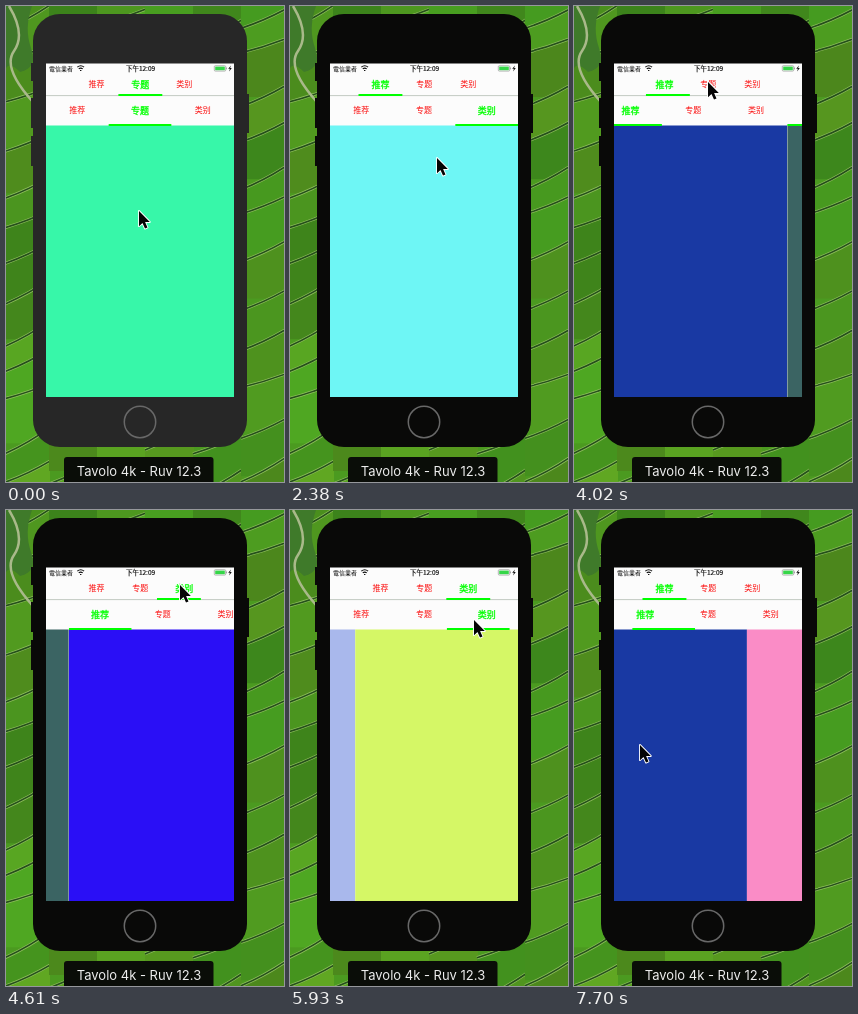
An HTML page that plays this animation: 278x476 px, repeating every 8 s.

```html
<!DOCTYPE html>
<html lang="zh-CN">
<head>
<meta charset="utf-8">
<title>Nested tab pages</title>
<style>
  html, body { margin: 0; width: 100%; height: 100%; overflow: hidden; background: #4b9a20; }
  svg { display: block; width: 278px; height: 476px; }
  text { font-family: "Noto Sans CJK SC", "Noto Sans CJK", "Noto Sans", sans-serif; text-anchor: middle; }
  .tab { font-size: 8px; fill: #fb0d0d; }
  .tab.on { font-size: 9px; fill: #0f0; stroke: #0f0; stroke-width: .3; }
  .bar { fill: #0f0; }
  .status { font-size: 6px; fill: #111; }
  .clock { font-size: 6.5px; stroke: #111; stroke-width: .2; }
  #phone { fill: #272727; }
  .active #phone { fill: #090908; }
  .caption { font: 13px Inter, Roboto, sans-serif; fill: #ededed; }
</style>
</head>
<body>
<svg id="stage" viewBox="0 0 278 476">
  <defs>
    <clipPath id="screen"><rect x="40" y="57.5" width="188" height="333.5"/></clipPath>
    <clipPath id="page"><rect x="40" y="90" width="188" height="302"/></clipPath>
  </defs>

  <rect width="278" height="476" fill="#4b9a20"/>
  <g id="fields"></g>
  <path d="M0 0H26Q18 22 25 42T14 66Q4 56 0 62Z" fill="#3f7a2a"/>
  <path d="M3 0Q20 28 8 45T27 96" fill="none" stroke="#a9b98a" stroke-width="2.5"/>

  <g id="phone">
    <rect x="27" y="8" width="214" height="433" rx="27"/>
    <path d="M25 57h3v18h-3zM25 92h3v30h-3zM25 130h3v30h-3zM240 88h3v39h-3z"/>
  </g>
  <circle cx="134" cy="416" r="15.7" fill="none" stroke="#686868" stroke-width="1.5"/>

  <g clip-path="url(#screen)">
    <rect x="40" y="57" width="188" height="335" fill="#fcfcfc"/>
    <g id="pages"></g>
    <path d="M40 89.6H228" stroke="#b4beb4" stroke-width=".8"/>
    <g id="top"></g>
    <text class="status" x="55" y="64.7">電信業者</text>
    <text class="status clock" x="134.5" y="64.8">下午12:09</text>
    <g fill="none" stroke="#111" stroke-width="1.1">
      <path d="M71.3 61.2q3.4-2.8 6.8 0M72.7 62.9q2-1.6 4 0"/>
      <path d="M74 64.5h1.4"/>
    </g>
    <rect x="208.3" y="59.7" width="11.4" height="5.4" rx="1" fill="none" stroke="#999" stroke-width=".7"/>
    <rect x="209.2" y="60.6" width="9.6" height="3.6" fill="#35d648"/>
    <path d="M220.4 61.5v1.8" stroke="#999"/>
    <path d="M225 59.5l-2.8 3.3h1.7l-.8 2.6 2.7-3.4h-1.7z" fill="#111"/>
  </g>

  <rect x="58" y="451" width="149.5" height="30" rx="3" fill="#0a0d08"/>
  <text class="caption" x="133" y="470.3">Tavolo 4k - Ruv 12.3</text>
  <path id="cursor" d="M0 0V15.2L3.5 12 6 17.6 8.5 16.5 6.1 11H10.8Z" fill="#050505"
    stroke="#fff" stroke-width="1.8" stroke-linejoin="round" paint-order="stroke"/>
</svg>

<script>
const LOOP = 8000, FIRST = 750, STEP = 147.8;
const LEFT = 40, WIDTH = 188;
const NAMES = ['推荐', '专题', '类别'];
const COLORS = [
  ['#1939a3', '#fa8cc6', '#6ef6f5'],
  ['#3b6463', '#37f7a9', '#8d6ed0'],
  ['#2a0ff6', '#a9b8ec', '#d5f766']
];
const INITIAL = { x: 133, y: 205, outer: 1, inner0: 2, inner1: 1, inner2: 0 };

const tweens = [];
const tween = (prop, at, duration, to) => tweens.push({ prop, at, duration, to });

function glide(at, duration, x, y) {
  tween('x', at, duration, x);
  tween('y', at, duration, y);
}

function swipe(at, duration, x, y, prop, to) {
  glide(at, duration, x, y);
  tween(prop, at, duration, to);
}

function tap(at, x, y, prop, to) {
  glide(at - 330, 300, x, y);
  tween(prop, at, 300, to);
}

swipe(620, 430, 248, 192, 'inner1', 0);
glide(1200, 280, 105, 210);
swipe(1650, 420, 237, 195, 'outer', 0);
glide(2230, 140, 147, 152);
swipe(2380, 400, 235, 150, 'inner0', 1);
tap(3225, 79, 102, 'inner0', 0);
tap(3950, 134, 76, 'outer', 1);
tap(4358, 174, 75, 'outer', 2);
tap(5100, 138, 105, 'inner2', 1);
tap(5692, 184, 110, 'inner2', 2);
glide(6080, 140, 188, 128);
tap(6700, 92, 78, 'outer', 0);
glide(6960, 280, 121, 235);
swipe(7450, 240, 66, 235, 'inner0', .293);

function stateAt(time) {
  const state = { ...INITIAL };
  for (const { prop, at, duration, to } of tweens) {
    const p = Math.min(1, Math.max(0, (time - at) / duration));
    state[prop] += (to - state[prop]) * p * p * (3 - 2 * p);
  }
  return state;
}

const $ = id => document.getElementById(id);

function add(parent, tag, attrs, content = '') {
  const el = document.createElementNS('http://www.w3.org/2000/svg', tag);
  for (const name in attrs) el.setAttribute(name, attrs[name]);
  el.textContent = content;
  return parent.appendChild(el);
}

const shift = (el, x, y = 0) => el.setAttribute('transform', `translate(${x} ${y})`);

function makeTabs(parent, left, width, textY, barY) {
  const bar = add(parent, 'rect', { class: 'bar', x: left, y: barY, width, height: 2 });
  const labels = NAMES.map((name, i) =>
    add(parent, 'text', { x: left + width * (i + .5), y: textY }, name));
  return offset => {
    shift(bar, offset * width);
    labels.forEach((label, i) => {
      const on = i === Math.round(offset);
      label.setAttribute('class', on ? 'tab on' : 'tab');
      label.setAttribute('y', textY + (on ? .4 : 0));
    });
  };
}

function makePage(colors) {
  const group = add($('pages'), 'g', { 'clip-path': 'url(#page)' });
  const strip = add(group, 'g', {});
  colors.forEach((fill, i) =>
    add(strip, 'rect', { x: LEFT + WIDTH * i, y: 119.5, width: WIDTH, height: 272, fill }));
  const setTabs = makeTabs(group, LEFT, WIDTH / 3, 107.4, 118);
  return (x, offset) => {
    shift(group, x);
    shift(strip, -offset * WIDTH);
    setTabs(offset);
  };
}

// Sloping strips of varied green, edged by a dark ditch and a pale bank.
function drawFields() {
  let seed = 11;
  const random = () => (seed = seed * 16807 % 2147483647) / 2147483647;
  for (let column = 0; column < 6; column++) {
    const x = column * 48 - 5;
    for (let y = -30; y < 490; y += 28 + random() * 22) {
      const slope = 14 + random() * 14;
      const edge = `M${x} ${y + slope}q26 ${-slope * .4} 49 ${-slope}`;
      const fill = `hsl(${92 + random() * 10} 66% ${31 + random() * 9}%)`;
      add($('fields'), 'path', { d: `${edge}v60h-49z`, fill });
      add($('fields'), 'path', { d: edge, fill: 'none', stroke: '#8fbd5c', 'stroke-width': 3 });
      add($('fields'), 'path', { d: edge, fill: 'none', stroke: '#24501a', 'stroke-width': 1.6 });
    }
  }
}

drawFields();
const setTop = makeTabs($('top'), 68.5, 43.9, 81.4, 88);
const setPages = COLORS.map(makePage);
const start = performance.now();

function draw(now) {
  const time = Math.max(0, now - start) % LOOP;
  const step = Math.floor((time - FIRST) / STEP);
  const state = stateAt(FIRST + step * STEP);
  setTop(state.outer);
  setPages.forEach((set, i) => set((i - state.outer) * WIDTH, state['inner' + i]));
  shift($('cursor'), state.x, state.y);
  $('stage').classList.toggle('active', step >= 0);
  requestAnimationFrame(draw);
}
draw(start);
</script>
</body>
</html>
```
